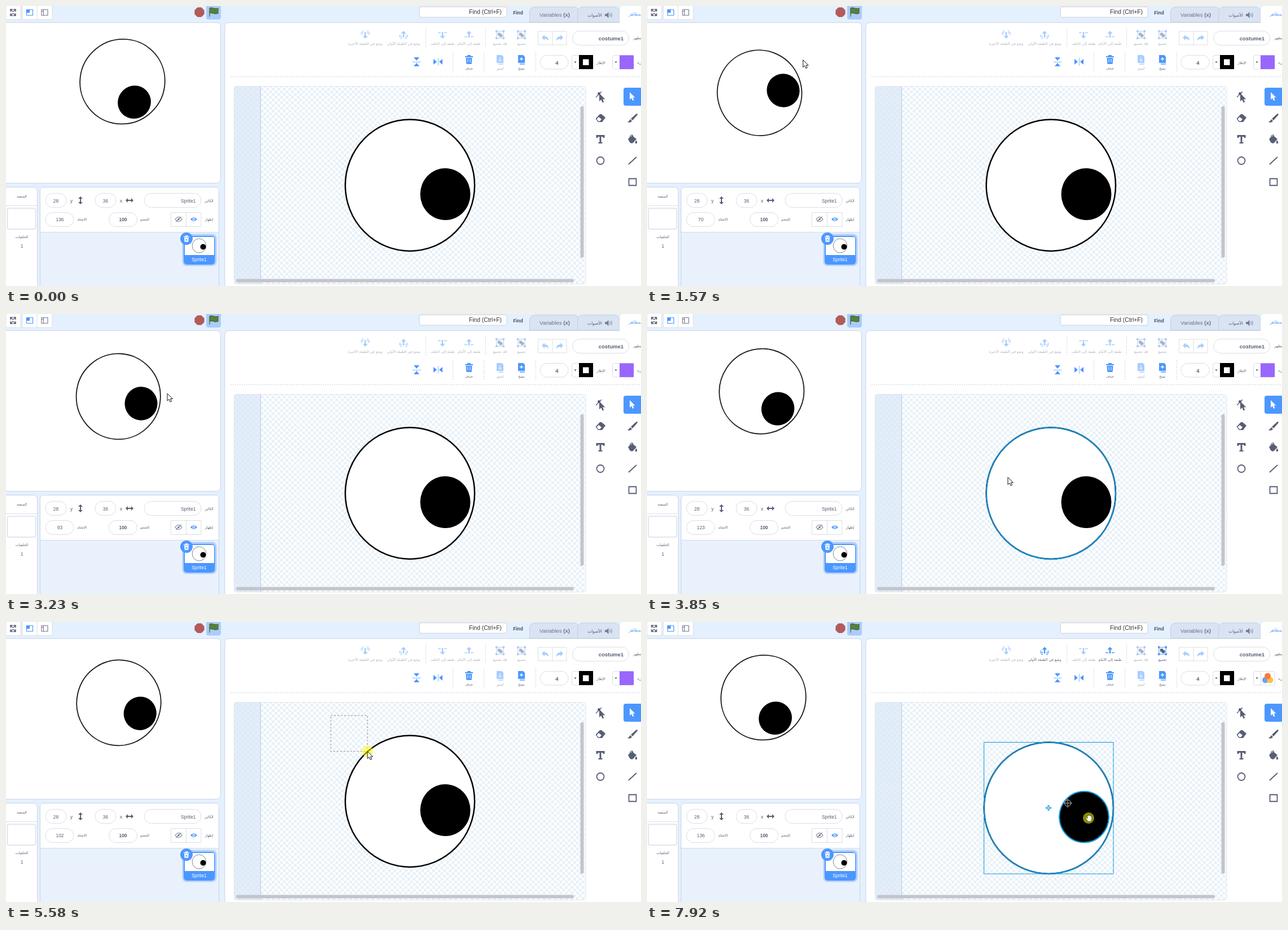
Animation, 1126 px wide and 497 px high, one loop 7.99 s. Source, as an HTML page:

```html
<!DOCTYPE html>
<html lang="en">
<head>
<meta charset="utf-8">
<title>Eye follows the pointer</title>
<style>
html, body { margin: 0; width: 100%; height: 100%; overflow: hidden; background: #e5f0ff; }
svg { display: block; width: 1126px; height: 497px; }
text { font: 8.4px "Liberation Sans", Arial, sans-serif; fill: #575e75; text-anchor: middle; }
.ar { font: 6.3px "DejaVu Sans", "Noto Sans", sans-serif; }
.end { text-anchor: end; }
.bold { font-weight: bold; }
.panel { fill: #fff; stroke: #c9d5e6; }
.pill { fill: #fff; stroke: #dbdee6; }
.blue { fill: #4c97ff; }
.dark { fill: #575e75; }
.line { fill: none; stroke: #575e75; stroke-width: 1.8; }
.sep { fill: none; stroke: #ccd1da; stroke-dasharray: 2 2; }
.off { opacity: .48; }
.pick { fill: none; stroke: #0a95e0; stroke-width: 2; }
</style>
</head>
<body>
<svg viewBox="0 0 1126 497">
<defs>
  <pattern id="checks" x="746" y="321.5" width="9.81" height="9.81" patternUnits="userSpaceOnUse">
    <path d="M0 0h4.905v9.81h4.905v-4.905H0z" fill="#e8f1f8"/>
  </pattern>
  <g id="up">
    <path class="blue" d="M0-7 4.500-2H1.300V5H-1.300V-2H-4.500Z"/>
    <path d="M-8 3.500h5M3 3.500h5" stroke="#4c97ff" stroke-width="1.300"/>
  </g>
  <g id="upAll"><use href="#up"/><path d="M-6 6.500h3M3 6.500h3M-8 .8h3M5 .8h3" stroke="#4c97ff" stroke-width="1.300"/></g>
  <g id="page">
    <path class="blue" d="M-6-8H3L6-5V6H-6Z"/>
    <path d="M-3 8H6" stroke="#4c97ff" stroke-width="1.5"/>
  </g>
  <g id="group">
    <path d="M-6-6H6V6H-6Z" fill="none" stroke="#4c97ff"/>
    <path class="blue" d="M-8-8h3.500v3.500h-3.500zM4.500-8h3.500v3.500h-3.500zM-8 4.500h3.500v3.500h-3.500zM4.500 4.500h3.500v3.500h-3.500z"/>
    <path class="dark" d="M-4-3.500h5v5h-5z"/><circle class="dark" cx="1.500" cy="1.500" r="3"/>
  </g>
  <path id="undo" class="blue" d="M-6-1-1-6v3C4-3 6 0 6 5 4 2 2 1-1 1v3Z"/>
  <path id="mirror" class="blue" d="M-8-5-2 0-8 5Z"/>
  <path id="pointer" d="M0 0V13L3 10.200 5.200 15 7.500 14 5.400 9.500H9.400Z"/>
  <g id="bin">
    <path d="M-5.500-3H5.500L4.600 8h-9.200Z"/><path d="M-7-6h4v-2h6v2h4v2H-7Z"/>
  </g>
  <path id="arrows" class="dark" d="M-7 0-3-4v3H3V-4L7 0 3 4V1H-3V4Z"/>
  <g id="eyeIcon"><path d="M-6 0Q0-7 6 0Q0 7-6 0Z"/><circle r="2.400" fill="#fff"/><circle r="1.200"/></g>
</defs>

<rect width="1126" height="497" fill="#e5f0ff"/>

<!-- stage controls -->
<g class="pill">
  <path d="M0-2H26V24H0Z"/><path d="M29-2H82V24H29ZM55-2V24"/>
</g>
<path class="line" d="M8 10V6h4M8 6l4 4M17 10V6h-4M17 6l-4 4M8 13v4h4M8 17l4-4M17 13v4h-4M17 17l-4-4" style="stroke-width:1.500"/>
<g fill="none" stroke="#4c97ff" stroke-width="1.2"><path d="M36.500 6.500h11v10h-11z"/><path class="blue" d="M36.500 6.500h5v5h-5z"/></g>
<path d="M63 6.500h11v10H63zM66.500 6.500v10M63 9.500h3" fill="none" stroke="#777d90" stroke-width="1.2"/>
<path d="M339.500 3h7l4.500 4.500v7l-4.500 4.500h-7l-4.500-4.500v-7Z" fill="#b55a5a" stroke="#a14b4b"/>
<rect x="355" y="-4" width="26" height="28" rx="4" fill="#abccfb"/>
<path d="M361 19V4c5-3 8 3 15 0v9c-7 3-10-3-15 0" fill="#57803f" stroke="#456c35" stroke-width="1.3"/>

<!-- stage -->
<rect class="panel" x="-8" y="29.500" width="388.500" height="285" rx="7"/>
<g id="sprite" fill="#fff" stroke="#181818" stroke-width="1.800">
  <ellipse cx="-19.400" cy="-2.100" rx="74.600" ry="76"/>
  <ellipse cx="21.500" cy="8.300" rx="29" ry="29.800" fill="#000" stroke="none"/>
</g>

<!-- stage and sprite lists -->
<rect class="panel" x="-8" y="321.500" width="63.500" height="190" rx="7"/>
<path d="M0 354.500H55" stroke="#d5deec"/>
<rect class="pill" x="2.500" y="359" width="50" height="37" rx="3" stroke-width="1.500"/>
<rect x="60.500" y="321.500" width="317" height="190" rx="7" fill="#e9f1fc" stroke="#c9d5e6"/>
<path d="M61 401.500V329q0-7 7-7H370q7 0 7 7V401.500Z" fill="#fff"/><path d="M61 401.500H377" stroke="#d0dae9"/>
<text class="ar" x="28" y="340">المنصة</text>
<text class="ar" x="28" y="412">الخلفيات</text>
<text x="28" y="429">1</text>
<g class="pill">
  <rect x="70" y="332.500" width="37" height="25" rx="12.500"/>
  <rect x="158" y="332.500" width="37" height="25" rx="12.500"/>
  <rect x="245" y="332.500" width="101" height="25" rx="12.500"/>
  <rect x="70" y="366.500" width="50" height="25" rx="12.500"/>
  <rect x="182.500" y="366.500" width="50" height="25" rx="12.500"/>
  <path d="M292.500 366.500h53.500v25h-53.500zM319.500 366.500v25"/>
</g>
<text x="88.500" y="348.500">28</text><text x="116" y="348.500">y</text>
<text x="176.500" y="348.500">36</text><text x="204" y="348.500">x</text>
<text class="end" x="336.500" y="348.500">Sprite1</text>
<text id="direction" x="95.500" y="382">136</text>
<text class="bold" x="207.500" y="382">100</text>
<use href="#arrows" transform="translate(132 345) rotate(90)"/>
<use href="#arrows" transform="translate(219 345)"/>
<text class="ar" x="360" y="347.500">الكائن</text>
<text class="ar" x="360" y="381">إظهار</text>
<text class="ar" x="246" y="381">الحجم</text>
<text class="ar" x="135" y="381">الاتجاه</text>
<path d="M300 378.500q6-8 12 0q-6 8-12 0ZM301.500 383l9-9" fill="none" stroke="#7d8396" stroke-width="1.200"/><circle cx="306" cy="378.500" r="1.800" fill="#7d8396"/>
<use class="blue" href="#eyeIcon" x="333" y="378.500"/>
<rect x="312.500" y="404.500" width="61" height="57" rx="8" fill="#b3d1fd"/>
<rect class="blue" x="315" y="408" width="55.500" height="51" rx="6"/>
<path d="M317 442V413q0-3 3-3H366q3 0 3 3V442Z" fill="#fff"/>
<ellipse cx="342.500" cy="425.500" rx="12.300" ry="12.600" fill="#fff" stroke="#666" stroke-width=".8"/>
<circle cx="349.500" cy="427.500" r="5"/>
<text x="342.500" y="453" style="fill:#fff">Sprite1</text>
<circle class="blue" cx="320" cy="413" r="11"/>
<use href="#bin" fill="#fff" transform="translate(320 413) scale(.72)"/>
<path d="M318 413l4 4M322 413l-4 4" stroke="#4c97ff"/>

<!-- tabs -->
<rect x="388" y="29.500" width="760" height="490" rx="7" fill="#fff" stroke="#c9d5e6"/>
<g fill="#d9e3f2" stroke="#c3cddd">
  <path d="M928.500 29V12q0-10 10-10H1006q10 0 10 10V29Z"/>
  <path d="M1013.500 29V12q0-10 10-10H1078q10 0 10 10V29Z"/>
</g>
<path d="M1088 31V10q0-12 12-12H1130V31Z" fill="#fff"/>
<rect class="pill" x="733" y="1.500" width="155" height="18.500" rx="3" style="stroke:#cbd0d8"/>
<text class="end" x="879" y="14" style="font-size:10.300px;fill:#333">Find (Ctrl+F)</text>
<text class="bold" x="908" y="15" style="font-size:8.300px;fill:#444a60">Find</text>
<text x="973" y="19" style="font-size:9.700px;fill:#6b728a">Variables <tspan class="bold">(x)</tspan></text>
<text class="ar" x="1044" y="18.500" style="font-size:7.500px">الأصوات</text>
<path d="M1062 14h3l3.500-3.500v11l-3.500-3.500h-3z" fill="#777e93"/>
<path d="M1070.500 13.500q1.500 2.500 0 5M1073 12q2.500 4 0 8" fill="none" stroke="#777e93"/>
<text class="ar" x="1117" y="17" style="font-size:7.500px;fill:#4c97ff">المظاهر</text>

<!-- editor toolbar -->
<path class="sep" d="M744.500 39V75M850.500 39V75M939.500 82V118M792.500 82V118M847.500 82V118M398 125.500H1126"/>
<g class="off"><use href="#upAll" transform="translate(637 51) scale(1 -1)"/><text class="ar" x="637" y="69">وضع في الطبقة الأخيرة</text></g>
<g class="off live"><use href="#upAll" x="705" y="51"/><text class="ar" x="705" y="69">وضع في الطبقة الأولى</text></g>
<g class="off"><use href="#up" transform="translate(774 51) scale(1 -1)"/><text class="ar" x="774" y="69">طبقة إلى الخلف</text></g>
<g class="off live"><use href="#up" x="821" y="51"/><text class="ar" x="821" y="69">طبقة إلى الأمام</text></g>
<g class="off"><use href="#group" x="876" y="51"/><text class="ar" x="876" y="69">فك تجميع</text></g>
<g class="off live"><use href="#group" x="914" y="51"/><text class="ar" x="914" y="69">تجميع</text></g>
<g class="pill"><path d="M943.500 45h50.500v24h-50.500zM969 45v24"/><rect x="1004.500" y="44.500" width="100" height="25" rx="12.500"/><rect x="947" y="87.500" width="50" height="24.500" rx="12"/></g>
<g class="off"><use href="#undo" x="956" y="57"/><use href="#undo" transform="translate(982 57) scale(-1 1)"/></g>
<text class="end bold" x="1095" y="60.500" style="font-size:9.500px">costume1</text>
<text class="ar" x="1120" y="59">مظهر</text>
<use href="#mirror" x="766" y="99"/><use href="#mirror" transform="translate(766 99) scale(-1 1)"/>
<path d="M766.500 93v13M721 99.500h15" stroke="#4c97ff" stroke-dasharray="2 1"/>
<use href="#mirror" transform="translate(728 99) rotate(90)"/><use href="#mirror" transform="translate(728 99) rotate(-90)"/>
<use href="#bin" class="blue" x="821" y="95"/><path d="M819 94v6M823 94v6" stroke="#fff"/>
<text class="ar" x="821" y="112.500">حذف</text>
<g class="off"><use href="#page" x="876" y="95"/><path d="M876 91v6m-3-2 3 3 3-3" fill="none" stroke="#fff"/><text class="ar" x="876" y="112.500">لصق</text></g>
<use href="#page" x="914" y="95"/><path d="M914 91v6M911 94h6" stroke="#fff" stroke-width="1.300"/>
<text class="ar" x="914" y="112.500">نسخ</text>
<text class="bold" x="977" y="103.500" style="font-size:9.500px">4</text>
<g class="pill"><rect x="1003.500" y="87.500" width="37.500" height="24.500" rx="3"/><rect x="1075.500" y="87.500" width="37.500" height="24.500" rx="3"/></g>
<path class="dark" d="M1007.500 98.500h4l-2 3zM1079.500 98.500h4l-2 3z"/>
<path d="M1016 87h25v25h-25z"/><path d="M1023 94.500h10.500v10.500H1023z" fill="#fff"/>
<text class="ar" x="1055" y="102.500">الإطار</text><text class="ar" x="1125" y="102.500">ملء</text>
<path id="purple" d="M1088 87.500h25v24.500h-25z" fill="#9966ff"/>
<g id="mixed"><path d="M1088.500 88v24" stroke="#dbdee6"/><circle cx="1096.500" cy="103" r="5.500" fill="#6ba0ff"/><circle cx="1105" cy="103" r="5.500" fill="#ffc23d"/><circle cx="1100.500" cy="96" r="5.500" fill="#f77b3b"/></g>

<!-- canvas -->
<rect x="404.500" y="142.500" width="623.500" height="351" rx="4" fill="#fff" stroke="#dfe6ef"/>
<rect x="405" y="143" width="623" height="350" fill="url(#checks)"/>
<path d="M405 143h46.500v350H405z" fill="#dce8f8" opacity=".72"/>
<path d="M451.500 143V493" stroke="#b4c8e4"/>
<path d="M411 487.500H1004M1021.500 181V444" stroke="#c3c5c9" stroke-width="6" stroke-linecap="round"/>

<!-- drawing tools -->
<g class="dark">
  <use href="#pointer" transform="translate(1052 155) scale(1.100)"/>
  <circle cx="1051.500" cy="155.500" r="2.500"/><path d="M1046 162l10-10" class="line" style="stroke-width:1.200"/>
  <path d="M1045.500 200l7.500-8h3l7 6-6 8h-7Z"/><path d="M1047.500 200.500l3.500-3.500 5 4-3 3.500h-2.500Z" fill="#fff"/>
  <path d="M1046.500 229h15v5h-2.500l-1-2h-2.500v10h2v2h-7v-2h2v-10h-2.500l-1 2h-2.500Z"/>
  <path d="M1108 200l10-9q3 0 1 3l-8 9ZM1107 201l3 3q-2 4-8 2 3-1 5-5Z"/>
  <path d="M1103 236l7-6 8 6-6 7q-3 2-6-1ZM1117 238q4 5 1 6t-2-3Z"/><path class="line" d="M1106 236q0-8 5-7l2 6" style="stroke-width:1.200"/>
</g>
<circle class="line" cx="1054" cy="274.500" r="6.500"/>
<path class="line" d="M1104 281l14-13M1104.500 306.500h13v12h-13z"/>
<rect class="blue" x="1095" y="145" width="36" height="32" rx="4"/>
<use href="#pointer" fill="#fff" x="1106" y="153"/>

<!-- costume -->
<g id="costume">
  <ellipse cx="716.300" cy="318.200" rx="114.700" ry="116.700" fill="#fff" stroke="#000" stroke-width="2.500"/>
  <ellipse cx="779" cy="334" rx="44.500" ry="46"/>
  <ellipse id="ringMark" class="pick" cx="716.300" cy="318.200" rx="114.700" ry="116.700"/>
  <ellipse id="pupilMark" class="pick" cx="779" cy="334" rx="43.700" ry="45.200"/>
  <g id="bounds">
    <path class="pick" d="M601.500 201.500H831V435H601.500Z" style="stroke-width:1"/>
    <path d="M716 313v10M711 318h10" stroke="#0a95e0" stroke-width="3"/><path d="M716 314v8M712 318h8" stroke="#d9f0ff"/>
  </g>
  <g id="handles" fill="#0a95e0">
    <path d="M716 435v13" stroke="#0a95e0"/>
    <path d="M711 449q5 4 10 0" fill="none" stroke="#0a95e0" stroke-width="3"/><path d="M708.500 453v-7h6zM723.500 453v-7h-6z"/>
  </g>
</g>
<g id="origin" fill="none" stroke="#8a8a8a" stroke-width="1.300"><circle cx="746" cy="321.500" r="5.500"/><path d="M738 321.500h16M746 313.500v16"/></g>
<rect id="marquee" fill="none" stroke="#888" stroke-dasharray="3 3"/>

<g id="mouse">
  <circle id="press" r="10" fill="#ff0" opacity=".54"/>
  <use id="arrow" href="#pointer" fill="#fff" stroke="#111"/>
  <path id="hand" d="M-5 0-3.500-1-2 1V-4h2v-1h2v1h2v1h1.500V2Q5 6 2 6H-1Z" fill="#fff" stroke="#333" stroke-width=".5"/>
</g>
</svg>
<script>
const LOOP = 7990, LAG = 100;
const DRAG = 5440, RELEASE = 6230, GRAB = 7310;
const pivot = { x: 218.5, y: 149.5 };
const dragFrom = { x: 576, y: 166 }, grabFrom = { x: 787, y: 336 };

// Pointer path: time, x, y
const path = [
  [0, 1040, 520], [220, 1040, 520], [270, 1034, 485], [600, 730, 350], [850, 480, 230],
  [1010, 385, 190], [1080, 359, 172], [1300, 350, 140], [1470, 325, 111], [1570, 277, 96],
  [1700, 240, 55], [1850, 200, 37], [1950, 150, 50], [2080, 120, 120], [2180, 112, 150],
  [2280, 130, 100], [2370, 190, 58], [2450, 234, 92], [2550, 252, 106], [2650, 272, 140],
  [2760, 262, 190], [2850, 258, 190], [2990, 278, 170], [3130, 284, 153], [3230, 285, 141],
  [3510, 577, 165], [3850, 640, 290], [4330, 597, 196], [4610, 597, 196], [4800, 622, 196],
  [5370, 585, 178], [5440, 576, 166], [6130, 894, 477], [6200, 884, 470], [6640, 797, 336],
  [7240, 797, 336], [7310, 787, 336], [7660, 790, 348], [7910, 790, 348], [7920, 783, 348], [7990, 783, 348]
];

const $ = id => document.getElementById(id);
const show = (id, on) => { $(id).style.display = on ? "" : "none"; };
const shift = (id, x, y) => $(id).setAttribute("transform", `translate(${x} ${y})`);

function pointerAt(t) {
  const i = Math.max(1, path.findIndex(p => p[0] >= t));
  const [t0, x0, y0] = path[i - 1], [t1, x1, y1] = path[i];
  const k = Math.max(0, (t - t0) / (t1 - t0));
  return { x: x0 + (x1 - x0) * k, y: y0 + (y1 - y0) * k };
}

// The sprite sees the pointer clamped to the stage.
function directionAt(t) {
  const p = pointerAt(Math.max(0, t - LAG));
  const dx = Math.min(380, Math.max(0, p.x)) - pivot.x;
  const dy = Math.min(315.5, Math.max(29, p.y)) - pivot.y;
  return Math.atan2(dx, -dy) * 180 / Math.PI;
}

const inside = (p, cx, cy, rx, ry) => Math.hypot((p.x - cx) / rx, (p.y - cy) / ry) < 1;

for (const x of [601.5, 716, 831]) for (const y of [201.5, 318, 435]) {
  if (x === 716 && y === 318) continue;
  const dot = document.createElementNS("http://www.w3.org/2000/svg", "circle");
  Object.entries({ cx: x, cy: y, r: 3.3 }).forEach(([k, v]) => dot.setAttribute(k, v));
  $("handles").append(dot);
}

function draw(t) {
  const p = pointerAt(t), dir = directionAt(t);
  const selected = t >= RELEASE, grabbed = t >= GRAB, marking = t >= DRAG && !selected;

  $("sprite").setAttribute("transform", `translate(${pivot.x} ${pivot.y}) rotate(${dir - 90})`);
  $("direction").textContent = Math.round(dir);

  const onPupil = inside(p, 779, 334, 44.5, 46);
  const onEye = inside(p, 716, 318, 115, 117);
  show("pupilMark", selected || (!marking && onPupil));
  show("ringMark", selected || (!marking && onEye && !onPupil));
  show("bounds", selected);
  show("handles", selected && !grabbed);
  show("origin", grabbed);
  show("mixed", selected);
  show("purple", !selected);
  document.querySelectorAll(".live").forEach(el => el.classList.toggle("off", !selected));
  shift("costume", grabbed ? p.x - grabFrom.x : 0, grabbed ? p.y - grabFrom.y : 0);

  show("marquee", marking);
  const box = {
    x: Math.min(p.x, dragFrom.x), y: Math.min(p.y, dragFrom.y),
    width: Math.abs(p.x - dragFrom.x), height: Math.abs(p.y - dragFrom.y)
  };
  for (const k in box) $("marquee").setAttribute(k, box[k]);

  shift("mouse", p.x, p.y);
  show("press", (t >= 4400 && t < 4610) || marking || grabbed);
  show("arrow", !grabbed);
  show("hand", grabbed);
}

const start = performance.now();
(function tick() {
  draw((performance.now() - start) % LOOP);
  requestAnimationFrame(tick);
})();
</script>
</body>
</html>
```
